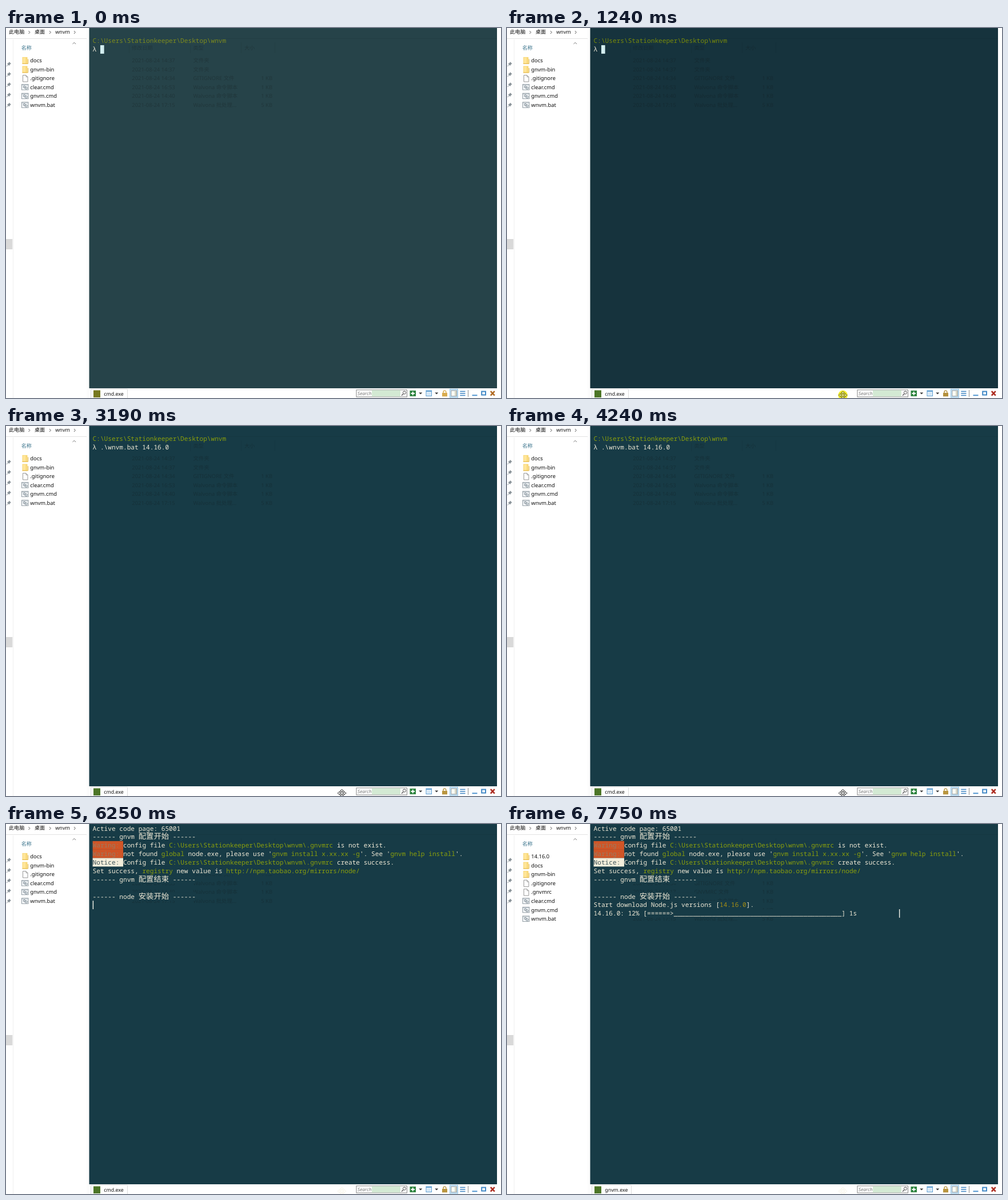
Recreate the animation shown at these times as an HTML page. Size 866 px wide and 647 px high, loop 8000 ms.

```html
<!DOCTYPE html>
<html lang="zh-CN">
<head>
<meta charset="utf-8">
<style>
  html, body { margin: 0; width: 100%; height: 100%; overflow: hidden; background: #fff; }
  svg { display: block; width: 866px; height: 647px; }
  text { white-space: pre; text-rendering: geometricPrecision; }
  .ui { font: 9.4px 'Noto Sans', 'Noto Sans CJK SC', 'Noto Sans CJK', sans-serif; fill: #111; }
  .tab { font-size: 8.8px; }
  .ghost { fill: #000; opacity: .25; }
  .mono { font: 11.13px 'Noto Sans Mono', 'Noto Sans CJK SC', 'Noto Sans CJK', monospace; fill: #eee8d5; }
  .han { font-size: 13.36px; font-family: 'Noto Sans CJK SC', 'Noto Sans CJK', sans-serif; }
  .bg { fill: var(--bg); }
  .g { fill: var(--path); }
  .y { fill: #a58d14; }
  .w { fill: #9a7c62; }
  .n { fill: #40555a; }
</style>
</head>
<body>
<svg id="stage" viewBox="0 0 866 647"></svg>
<script>
const LOOP = 8000, X0 = 151.6, CW = 6.678, LH = 14.87;
const stage = document.getElementById('stage');
const parts = [];

const rect = (x, y, w, h, fill, more = '') =>
  `<rect x="${x}" y="${y}" width="${w}" height="${h}" fill="${fill}" ${more}/>`;
const line = (d, color, width = 1) =>
  `<path d="${d}" fill="none" stroke="${color}" stroke-width="${width}"/>`;
const shape = (d, fill) => `<path d="${d}" fill="${fill}"/>`;
const ui = (x, y, s, more = '') => `<text class="ui" x="${x}" y="${y}" ${more}>${s}</text>`;
const colX = c => X0 + c * CW;
const rowY = r => .3 + r * LH;

// Show markup from time a up to time b.
const show = (a, b, svg) => parts.push({ a, b, svg });
const always = svg => show(0, LOOP, svg);

// One terminal row; runs are [text, class] pairs, wide characters take two columns.
function row(r, ...runs) {
  let col = 0, out = '';
  for (const [str, cls = ''] of runs) {
    for (const bit of str.match(/[\u2e80-\u9fff]+|[^\u2e80-\u9fff]+/g)) {
      const han = bit.charCodeAt(0) >= 0x2e80;
      const safe = bit.replace(/>/g, '&gt;');
      const box = { w: '#cf5527', n: '#f3eedb' }[cls];
      const cols = bit.length * (han ? 2 : 1);
      if (box) out += rect(colX(col), rowY(r) - .2, cols * CW, LH + .2, box);
      out += `<text class="mono ${cls} ${han ? 'han' : ''}" x="${colX(col)}" y="${rowY(r) + 11.3}">${safe}</text>`;
      col += cols;
    }
  }
  return `<rect class="bg" x="${X0}" y="${rowY(r)}" width="${col * CW}" height="${LH}"/>` + out;
}
const bar = (r, c) => rect(colX(c) + .1, rowY(r), 1.4, LH, '#f4f4ea');

// ---- Explorer ----
const files = [
  ['docs', 'dir', '14:37', '文件夹', ''],
  ['gnvm-bin', 'dir', '14:37', '文件夹', ''],
  ['.gitignore', 'doc', '14:34', 'GITIGNORE 文件', '1 KB'],
  ['clear.cmd', 'cmd', '16:53', 'Walvona 命令脚本', '1 KB'],
  ['gnvm.cmd', 'cmd', '14:40', 'Walvona 命令脚本', '1 KB'],
  ['wnvm.bat', 'cmd', '17:15', 'Walvona 批处理...', '5 KB']
];
const later = [
  ['14.16.0', 'dir', '17:17', '文件夹', ''], ...files.slice(0, 3),
  ['.gnvmrc', 'doc', '17:17', 'GNVMRC 文件', '1 KB'], ...files.slice(3)
];
const icons = {
  dir: y => rect(28.5, y - 6, 9, 12, '#f8d775') + rect(29.5, y - 5, 5, 10, '#ffe69a') +
    line(`M28.5 ${y + 5.5}h10v-8`, '#e2b548'),
  doc: y => `<path d="M29.5 ${y - 5.5}h5.5l3 3v8.5h-8.5z" fill="#fff" stroke="#8c8c8c" stroke-width=".9"/>` +
    line(`M35 ${y - 5.5}v3h3`, '#8c8c8c', .8),
  cmd: y => rect(27.5, y - 5, 11.5, 9.5, '#f7fafc', 'stroke="#87929a" stroke-width=".9"') +
    line(`M28 ${y - 3.6}h11`, '#a9b4bc', .9) +
    `<g fill="#dfe6ea" stroke="#74818a" stroke-width=".9"><circle cx="32" cy="${y - .6}" r="1.8"/><circle cx="35.3" cy="${y + 1.4}" r="2"/></g>`
};
const eachFile = (list, draw) => list.map((f, i) => draw(f, 56.9 + i * 15.57)).join('');
const names = list => eachFile(list, ([name, kind], y) => icons[kind](y) + ui(42.3, y + 3.3, name));
const ghosts = list => '<g class="ghost">' + eachFile(list, ([, , time, type, size], y) =>
  ui(220.3, y + 3.3, '2021-08-24 ' + time) + ui(327.5, y + 3.3, type) +
  ui(466, y + 3.3, size, 'text-anchor="end"')) + '</g>';

always(
  rect(0, 0, 866, 647, '#fff') +
  line('M0 18.5H141', '#e3e3e3') + line('M12.5 20V647', '#efefef') + rect(141, 0, 4.5, 647, '#fcfcfc') +
  ui(5, 10.3, '此电脑', 'style="font-size:9.1px"') + ui(50, 10.3, '桌面', 'style="font-size:9.1px"') +
  ui(86.3, 10.3, 'wnvm', 'style="font-size:9px"') +
  [39.5, 76, 119].map(x => line(`M${x} 5l2.3 2.5l-2.3 2.5`, '#555', 1)).join('') +
  line('M116.5 28l2.8-2.6l2.8 2.6', '#777', 1) +
  ui(26.7, 38.2, '名称', 'style="font-size:9.1px;fill:#37718a"') +
  [63, 81, 99, 117, 134.5].map(y =>
    `<g transform="translate(5 ${y})">` + shape('M.5-4L4-.5L2.6 0L.4 3L-3-.4L0-2.6z', '#8a9399') +
    line('M-1.5 1.3L-4 4', '#8a9399') + '</g>').join('') +
  rect(0, 369, 11.3, 18, '#d9d9d9'));
show(0, 6800, names(files));
show(6800, LOOP, names(later));

// ---- Terminal ----
always('<rect class="bg" x="145.5" y="0" width="713.5" height="630"/>' +
  '<g class="ghost">' + ui(220, 38.2, '修改日期', 'style="font-size:9.1px"') +
  ui(327.5, 38.2, '类型', 'style="font-size:9.1px"') + ui(417, 38.2, '大小', 'style="font-size:9.1px"') + '</g>' +
  line('M146 18.5H859M215.5 25V44M322.5 25V44M411.5 25V44M470.5 25V44', 'rgba(0,0,0,.07)'));
show(0, 6800, ghosts(files));
show(6800, LOOP, ghosts(later));

const home = 'C:\\Users\\Stationkeeper\\Desktop\\wnvm';
const rc = home + '\\.gnvmrc';
show(0, 5380, row(1, [home, 'g']));
show(0, 2650, row(2, ['λ']));
show(2650, 5380, row(2, ['λ .\\wnvm.bat 14.16.0']));
show(0, 1320, rect(colX(2), rowY(2), CW, LH, '#d3eef0'));

show(5380, LOOP, row(0, ['Active code page: 65001']) + row(1, ['------ gnvm 配置开始 ------']));
show(5710, LOOP,
  row(2, ['Waring: ', 'w'], ['config file '], [rc, 'g'], [' is not exist.']) +
  row(3, ['Waring: ', 'w'], ['not found '], ['global', 'g'], [" node.exe, please use '"],
    ['gnvm install x.xx.xx -g', 'g'], ["'. See '"], ['gnvm help install', 'g'], ["'."]) +
  row(4, ['Notice: ', 'n'], ['Config file '], [rc, 'g'], [' create success.']));
show(5980, LOOP,
  row(5, ['Set success, '], ['registry', 'g'], [' new value is '], ['http://npm.taobao.org/mirrors/node/', 'g']) +
  row(6, ['------ gnvm 配置结束 ------']) + row(8, ['------ node 安装开始 ------']));
show(6400, LOOP, row(9, ['Start download Node.js versions ['], ['14.16.0', 'y'], ['].']));

const progress = [[6510, 0], [6730, 1], [6800, 2], [6870, 3], [6940, 4], [7140, 6],
  [7340, 8], [7410, 10], [7480, 11], [7750, 12], [LOOP]];
progress.slice(0, -1).forEach(([t, pct], i) => {
  const done = pct >> 1;
  show(t, progress[i + 1][0],
    row(10, [`14.16.0: ${pct}% [${'='.repeat(done)}>${'_'.repeat(50 - done)}] 1s`]));
});

// Caret: from, to, row, column
[[1320, 1860, 2, 2], [2380, 2650, 2, 2], [2650, 3190, 2, 20], [3710, 4240, 2, 20], [4770, 5310, 2, 20],
 [5310, 5380, 3, 0], [5380, 5710, 2, 0], [5710, 5980, 5, 0], [5980, 6400, 9, 0], [6400, 6510, 10, 0],
 [6510, LOOP, 10, 80]].forEach(([a, b, r, c]) => show(a, b, bar(r, c)));

// ---- Status bar ----
const tab = (w, label) => line(`M148.5 647V631.5H${148 + w}.5V647`, '#dcdcdc') +
  '<rect x="153" y="633.5" width="12" height="12.5" fill="var(--mark)"/>' +
  ui(171.3, 643, label, 'style="font-size:8.8px"');
show(0, 6310, tab(64, 'cmd.exe'));
show(6310, LOOP, tab(69, 'gnvm.exe'));

always(
  rect(613, 632.8, 88.5, 12.2, '#fff', 'stroke="#858585"') + rect(640, 633.4, 50, 11, '#d3e9d3') +
  ui(615, 642, 'Search', 'style="font-size:8.2px;font-style:italic;fill:#777"') +
  '<circle cx="697" cy="637.6" r="2.6" fill="none" stroke="#555"/>' + line('M695 639.7l-3 3', '#555', 1.3) +
  rect(706.5, 634, 10.5, 10, '#2f8440') + line('M708.5 639h6.5M711.7 635.8v6.5', '#fff', 1.8) +
  shape('M722.3 637.5h6l-3 3zM750.3 637.5h6l-3 3z', '#333') +
  rect(735, 634, 9.5, 9.5, '#e4f1fb', 'stroke="#5c9cd0"') + line('M735 635.3h9.5', '#5c9cd0', 1.6) +
  line('M738.3 638v4M741.3 638v4', '#b4d3ea') +
  '<path d="M765 639v-2.5a2.4 2.4 0 0 1 4.8 0V639" fill="none" stroke="var(--lock)" stroke-width="1.4"/>' +
  '<rect x="763" y="638" width="9" height="6.3" fill="var(--lock)"/>' +
  rect(776.5, 631.5, 14, 14.5, '#cfe8f8', 'stroke="#93c4e4"') +
  rect(778.8, 634, 9.7, 9.8, '#fbfbf4', 'stroke="#8f9aa3"') + rect(785, 634.7, 3, 8.5, '#d7d6c5') +
  line('M794.3 635.5h9.2M794.3 639h9.2M794.3 642.5h9.2', '#3f84c2', 1.5) +
  line('M808.5 633V645', '#8b8b8b') +
  line('M815.5 642.3h9', '#4f94cf', 2) +
  rect(832.2, 635.6, 6.8, 6, '#fff', 'stroke="#4289c6" stroke-width="2"') +
  '<path d="M847.8 635.2l7 7.4M854.8 635.2l-7 7.4" stroke="var(--close)" stroke-width="2.5" fill="none"/>');

// ---- Pointer ----
const arrows = 'M0-7l3 3.2h-2v2.8h2.8v-2L7.5 0L3.8 3v-2H1v2.8h2L0 7l-3-3.2h2V1h-2.8v2L-7.5 0L-3.8-3v2H-1v-2.8h-2z';
const pointer = (x, y, fill, stroke, extra = '') =>
  `<g transform="translate(${x} ${y})">${extra}<path d="${arrows}" fill="${fill}" stroke="${stroke}" stroke-width=".9"/></g>`;
show(500, 570, pointer(592, 645, '#fff', '#222'));
show(570, 640, pointer(589, 643, '#fff', '#222'));
show(640, 1170, pointer(587.6, 642, '#fff', '#222'));
show(1170, 1320, pointer(587.6, 642, '#f8f58a', '#5a5a18', '<circle r="8.3" fill="#f3ee2e"/>'));
show(1320, 5980, pointer(587.6, 642, '#fff', '#222'));
show(5980, LOOP, pointer(587.6, 642, '#fff', '#f6f3e6'));

// ---- Window focus colours ----
const looks = [
  [0, { bg: '#264349', path: '#7d8b1e', lock: '#d8ab4e', close: '#b06a22', mark: '#77791f' }],
  [1240, { bg: '#16333d', path: '#788a0a', lock: '#b48f3c', close: '#ad2c20', mark: '#4c7526' }],
  [1320, { bg: '#173b46', path: '#8a9f0c', lock: '#b9953f', close: '#ad2c20', mark: '#4c7526' }]
];

stage.innerHTML = parts.map(p => `<g>${p.svg}</g>`).join('');
parts.forEach((p, i) => { p.el = stage.children[i]; });

function draw(t) {
  for (const p of parts) {
    const on = t >= p.a && t < p.b;
    if (on !== p.on) p.el.style.display = (p.on = on) ? '' : 'none';
  }
  const look = looks.filter(l => l[0] <= t).pop()[1];
  for (const key in look) stage.style.setProperty('--' + key, look[key]);
}

const start = performance.now();
function tick() {
  draw((performance.now() - start) % LOOP);
  requestAnimationFrame(tick);
}
tick();
</script>
</body>
</html>
```
